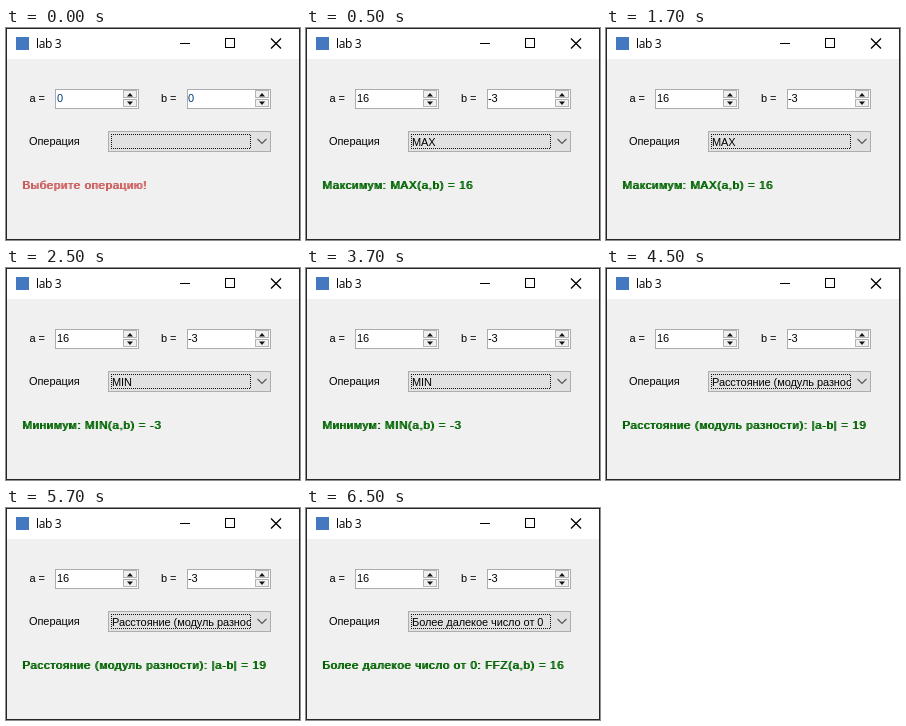
An HTML page for the animation above (8 s loop, 294 by 212 pixels).

```html
<!DOCTYPE html>
<html lang="ru">
<head>
<meta charset="utf-8">
<title>lab 3</title>
<style>
  html, body { margin: 0; width: 100%; height: 100%; overflow: hidden; }
  svg { display: block; width: 294px; height: 212px; }
  text {
    font: 11px "Liberation Sans", Arial, sans-serif;
    letter-spacing: -.08px;
    fill: #000;
    white-space: pre;
  }
  .title { font: 12px "Open Sans", "Noto Sans", sans-serif; letter-spacing: -.35px; }
  .crisp { shape-rendering: crispEdges; }
  .result { font-size: 11.5px; letter-spacing: .65px; fill: #006400; text-shadow: 1px 0 #006400; }
  .warn { fill: #cd5c5c; text-shadow: 1px 0 #cd5c5c; }
  .zero { fill: #003a78; }

  .state { visibility: hidden; animation: hold 8s step-end infinite; }
  .empty { animation-name: first; }
  .max { animation-delay: .5s; }
  .min { animation-delay: 2.5s; }
  .dist { animation-delay: 4.5s; }
  .far { animation-name: last; }
  @keyframes first { 0% { visibility: visible; } 6.25%, 100% { visibility: hidden; } }
  @keyframes hold { 0% { visibility: visible; } 25%, 100% { visibility: hidden; } }
  @keyframes last { 0% { visibility: hidden; } 81.25%, 100% { visibility: visible; } }
</style>
</head>
<body>
<svg viewBox="0 0 294 212">
  <defs>
    <clipPath id="comboClip"><rect x="105" y="105" width="140" height="18"/></clipPath>
    <g id="spin">
      <g class="crisp">
        <rect x=".5" y=".5" width="83" height="19" fill="#fff" stroke="#abadb3"/>
        <rect x="68.5" y="1.5" width="13" height="7" fill="#f0f0f0" stroke="#b4b4b4"/>
        <rect x="68.5" y="10.5" width="13" height="7" fill="#f0f0f0" stroke="#b4b4b4"/>
      </g>
      <path d="M72 7.5l3-3.5 3 3.5zM72 12.5h6l-3 3.5z" fill="#111"/>
    </g>
    <g id="values">
      <text x="51" y="74">16</text>
      <text x="182" y="74">-3</text>
    </g>
  </defs>

  <g class="crisp">
    <rect width="294" height="212" fill="#f0f0f0"/>
    <rect width="294" height="31" fill="#fff"/>
    <rect x=".5" y=".5" width="293" height="211" fill="none" stroke="#262626"/>
    <rect x="10" y="9" width="13" height="13" fill="#4478c0"/>
    <path d="M174 15.5h10M219.5 10.5h9v9h-9z" fill="none" stroke="#000"/>
  </g>
  <path d="M265 10.5l10 10M275 10.5l-10 10" stroke="#000" stroke-width="1.3"/>
  <text class="title" x="30" y="20">lab 3</text>

  <text x="23.5" y="74">a =</text>
  <text x="155" y="74">b =</text>
  <text x="23" y="117">Операция</text>
  <use href="#spin" x="49" y="61"/>
  <use href="#spin" x="181" y="61"/>

  <g class="crisp" fill="none">
    <rect x="102.5" y="103.5" width="162" height="20" fill="#e1e1e1" stroke="#adadad"/>
    <path d="M105 106.5h140M105 120.5h140M105.5 106v15M244.5 107v14" stroke="#111" stroke-dasharray="1 1"/>
  </g>
  <path d="M251.5 111l4.5 4.5 4.5-4.5" fill="none" stroke="#555" stroke-width="1.1"/>

  <g class="state empty">
    <text class="zero" x="51" y="74">0</text>
    <text class="zero" x="182" y="74">0</text>
    <text class="result warn" x="16" y="161">Выберите операцию!</text>
  </g>
  <g class="state max">
    <use href="#values"/>
    <text x="106" y="117.5">MAX</text>
    <text class="result" x="16" y="161">Максимум: MAX(a,b) = 16</text>
  </g>
  <g class="state min">
    <use href="#values"/>
    <text x="106" y="117.5">MIN</text>
    <text class="result" x="16" y="161">Минимум: MIN(a,b) = -3</text>
  </g>
  <g class="state dist">
    <use href="#values"/>
    <text x="106" y="117.5" clip-path="url(#comboClip)">Расстояние (модуль разности)</text>
    <text class="result" x="16" y="161">Расстояние (модуль разности): |a-b| = 19</text>
  </g>
  <g class="state far">
    <use href="#values"/>
    <text x="106" y="117.5" clip-path="url(#comboClip)">Более далекое число от 0</text>
    <text class="result" x="16" y="161">Более далекое число от 0: FFZ(a,b) = 16</text>
  </g>
</svg>
</body>
</html>
```
